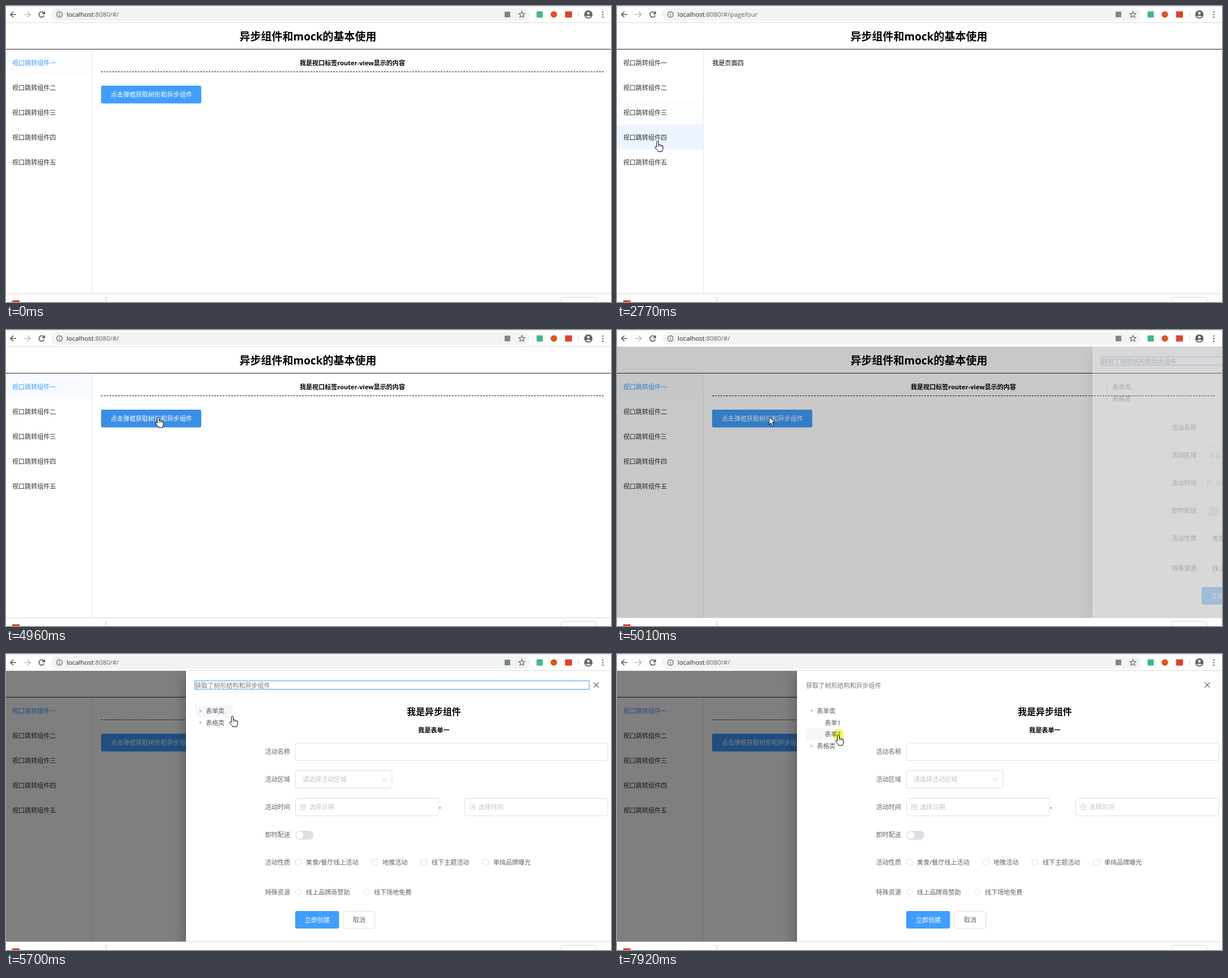
Recreate the animation shown at these times as an HTML page. Size 1069 by 524 pixels, loop 7.99 s.

```html
<!DOCTYPE html>
<html lang="zh-CN">
<head>
<meta charset="utf-8">
<title>异步组件和mock的基本使用</title>
<style>
  html, body { margin: 0; width: 100%; height: 100%; overflow: hidden; background: #fff; }
  body { position: relative; font: 11.07px "Noto Sans", "Noto Sans CJK SC", "Noto Sans CJK", "Noto Sans CJK JP", sans-serif; }
  svg { position: absolute; left: 0; top: 0; overflow: hidden; }
  text { white-space: pre; }
  .b { font-weight: 700; }
  .mid { text-anchor: middle; }
  .end { text-anchor: end; }
  .url { font: 11.4px "Open Sans", "Noto Sans", sans-serif; fill: #5f6368; }
  .line { fill: none; stroke: #dcdfe6; }
  .hint { fill: #c0c4cc; }
  #view { position: absolute; left: 0; top: 30px; width: 1069px; height: 479px; overflow: hidden; }
  #dim { position: absolute; inset: 0; background: #000; opacity: 0; }
  #drawer {
    position: absolute; left: 318px; top: 0; width: 751px; height: 479px; background: #fff; color: #606266;
    box-shadow: 0 6px 8px -4px rgba(0,0,0,.2), 0 13px 19px 2px rgba(0,0,0,.14), 0 5px 24px 4px rgba(0,0,0,.12);
  }
  #tree { position: absolute; left: 16px; top: 61px; width: 67px; }
  .row { position: relative; height: 20.5px; line-height: 20.5px; padding-left: 19px; white-space: nowrap; }
  #kids { overflow: hidden; height: 0; }
  #kids .row { padding-left: 33px; }
  .caret {
    position: absolute; left: 8px; top: 7px; width: 4px; height: 6px;
    background: #c0c4cc; clip-path: polygon(0 0, 100% 50%, 0 100%);
  }
  #ring {
    position: absolute; left: -10px; top: -10px; width: 20px; height: 20px; border-radius: 50%;
    background: #ffff5c; mix-blend-mode: multiply;
  }
</style>
</head>
<body>
<svg id="page" width="1069" height="524"></svg>
<div id="view">
  <div id="dim"></div>
  <div id="drawer">
    <svg width="751" height="479"><g id="form" transform="translate(-318 -30)"></g></svg>
    <div id="tree">
      <div class="row"><i class="caret" id="caret"></i>表单类</div>
      <div id="kids"><div class="row">表单1</div><div class="row">表单2</div></div>
      <div class="row"><i class="caret"></i>表格类</div>
    </div>
  </div>
</div>
<div id="ring"></div>
<svg width="1069" height="524">
  <g id="hand" fill="#fff" stroke="#000" stroke-linejoin="round">
    <path d="M-1.7 11V1.7a1.6 1.6 0 0 1 3.2 0V6.5q2-.8 2.9.6q2-.5 2.7.9q2.2-.2 2.2 1.8V13q0 2-1.6 4v1.8H.2v-1.4q-2-1.6-4.7-5.6q-.8-1.6.7-2q1.2-.1 2.1 1.2z"/>
    <path d="M1.5 6.5v3.5M4.4 7.1v3M7.1 8v2.5" fill="none" stroke-width=".8"/>
  </g>
  <path id="arrow" d="M0 0V13.5l3.1-2.9 2.2 5 2.3-1-2.2-4.8h4.3z" fill="#fff" stroke="#000" stroke-width=".9"/>
</svg>
<script>
const T = 7990, STEP = 10;
const EM = 11.07;
const MENU = { top: 78, row: 44, width: 152 };
const TREE = { left: 334, top: 91, row: 20.5, width: 67 };
const BUTTON = { x: 168, y: 141, w: 177, h: 31.5 };
const $ = id => document.getElementById(id);

// ---- drawing helpers (y is the middle of the text) ----
const text = (x, y, s, attrs = '') => `<text x="${x}" y="${y + 4}" ${attrs}>${s}</text>`;
const box = (x, y, w, h, attrs = 'class="line"', r = 3) =>
  `<rect x="${x}" y="${y}" width="${w}" height="${h}" rx="${r}" ${attrs}/>`;
const path = (d, color, width = 1, extra = '') =>
  `<path d="${d}" fill="none" stroke="${color}" stroke-width="${width}" ${extra}/>`;
const disc = (x, y, r, attrs) => `<circle cx="${x}" cy="${y}" r="${r}" ${attrs}/>`;
const solid = color => `fill="${color}"`;
const field = (x, y, w) => box(x, y - 15.5, w, 31);
const widthOf = s => [...s].reduce((w, c) => w + (c === '/' ? 4.1 : EM), 0);

const numerals = ['一', '二', '三', '四', '五'];
const routes = ['', 'pagetwo', 'pagethree', 'pagefour', 'pagefive'];
const ink = '#5f6368', bold = '#54575b', red = '#e2402c';

const toolbar =
  path('M0 .5H1069', '#dcdee1') + path('M0 29.5H1069', '#d9dbde') +
  box(80, 4, 846, 22, solid('#f1f3f4'), 11) +
  path('M18 15H8M13 10L8 15L13 20', bold, 1.6) +
  path('M32 15H43M38 10L43 15L38 20', '#b9bcbf', 1.6) +
  path('M67.4 13A4.8 4.8 0 1 0 67.6 16.5M68.2 9.5V13.6H64', bold, 1.6) +
  disc(94.5, 15, 4.9, `fill="none" stroke="${ink}" stroke-width="1.2"`) +
  path('M94.5 14.2V17.8M94.5 12V13.2', ink, 1.2) +
  text(107, 15, '<tspan fill="#202124">localhost</tspan>:8080/#/', 'class="url"') +
  text(200, 15, '', 'class="url" id="route"') +
  box(881, 10, 10, 10, solid('#80858a'), 1) +
  path('M911.5 9.6L913 13.4L917 13.6L913.9 16.1L915 20L911.5 17.8L908 20L909.1 16.1L906 13.6L910 13.4Z', ink, 1.1) +
  box(937.5, 9.5, 11, 11, solid('#41b883'), 0) +
  disc(968, 15, 5.8, solid('#e2531f')) +
  box(988, 9.5, 12, 11, solid(red), 0) +
  path('M1011.5 9V21', '#d5d7da') +
  disc(1029, 15, 7.3, solid(ink)) + disc(1029, 12.7, 2.3, solid('#fff')) +
  `<path d="M1024.3 18.6q4.7-3.4 9.4 0q-4.7 4-9.4 0z" fill="#fff"/>` +
  [-1, 0, 1].map(k => disc(1054.5, 15.2 + 4.5 * k, 1.3, solid(ink))).join('');

const menu = numerals.map((n, i) => {
  const y = MENU.top + MENU.row * i;
  return box(0, y, MENU.width, MENU.row, 'class="glow" fill="#ecf5ff"', 0) +
    text(11, y + 22.5, '视口跳转组件' + n, 'class="item" fill="#303133"');
}).join('');

const home = '<g id="home">' +
  text(612, 101, '我是视口标签router-view显示的内容', 'class="b mid"') +
  path('M168 116.5H1056', '#000', 1, 'stroke-dasharray="3 2"') +
  box(BUTTON.x, BUTTON.y, BUTTON.w, BUTTON.h, 'id="open"') +
  text(185, 157, '点击弹框获取树形和异步组件', solid('#fff')) + '</g>';

$('page').innerHTML = toolbar +
  '<text class="b mid" x="533.5" y="61" font-size="19">异步组件和mock的基本使用</text>' +
  menu + path('M0 76.5H1069', '#222') + path('M152.5 78V509', '#e6e6e6') +
  home + text(168.5, 101, '', 'id="other"') +
  path('M0 509.5H1069', '#d5d7da') + path('M176.5 515V524', '#c4c6c9') +
  box(11, 521, 13, 5, solid(red), 0) + box(980.5, 515.5, 62, 20, 'fill="none" stroke="#d5d7da"');

// ---- form in the drawer ----
const dark = solid('#606266'), pale = '#c0c4cc', hint = 'class="hint"';
const rowY = i => 173 + 49 * i;
const radioY = 421.5, left = 511.5;
const label = (s, y) => text(502, y, s, 'class="end" ' + dark);

function options(names, y, mark) {
  let x = left;
  return names.map(s => {
    const part = mark(x) + text(x + 18.6, y, s, dark);
    x += 42.5 + widthOf(s);
    return part;
  }).join('');
}

$('form').innerHTML =
  text(334, 56, '获取了树形结构和异步组件', solid('#72767b')) +
  box(333.5, 47.5, 697, 15, 'id="focus" fill="none" stroke="#4f9cee"', 0) +
  path('M1038.5 50.5l9 9m0-9l-9 9', '#606266', 1.1) +
  '<text class="b mid" x="756" y="107.5" font-size="15.9">我是异步组件</text>' +
  text(756, 135, '我是表单一', 'class="b mid"') +
  ['活动名称', '活动区域', '活动时间', '即时配送', '活动性质'].map((s, i) => label(s, rowY(i))).join('') +
  label('特殊资源', radioY) +
  field(left, rowY(0), 552) + field(left, rowY(1), 170.5) +
  field(left, rowY(2), 252.5) + field(810.5, rowY(2), 253) +
  text(524, rowY(1), '请选择活动区域', hint) + path('M664.5 220l4 4l4-4', pale) +
  path('M520.5 267.5h9v8h-9zm0 2.5h9m-6.5-4v2m4-2v2m-4.5 4.5h5', pale, .9) +
  text(535.5, rowY(2), '选择日期', hint) + text(765, rowY(2), '-') +
  disc(824.3, rowY(2), 4.6, `fill="none" stroke="${pale}"`) + path('M824.3 268v3.4h2.7', pale) +
  text(834.5, rowY(2), '选择时间', hint) +
  box(left, 313, 31.5, 15.8, solid('#dcdfe6'), 7.9) + disc(519.3, 320.9, 6.3, solid('#fff')) +
  options(['美食/餐厅线上活动', '地推活动', '线下主题活动', '单纯品牌曝光'], rowY(4),
    x => box(x, 363.5, 10.5, 10.5, 'class="line"', 1.5)) +
  options(['线上品牌商赞助', '线下场地免费'], radioY, x => disc(x + 5.4, radioY, 5.3, 'class="line"')) +
  box(511, 455, 77.5, 31, solid('#409eff')) + text(528, 470.5, '立即创建', solid('#fff')) +
  box(596.5, 455.5, 55, 30.5) + text(613, 470.5, '取消', dark);

// ---- the visitor: where the pointer goes and when it presses ----
const start = { x: 891, y: 500 };
const stops = [
  { leave: 70, arrive: 690, x: 60, y: 146, press: 990 },
  { leave: 1530, arrive: 1840, x: 60, y: 193, press: 1990 },
  { leave: 2240, arrive: 2600, x: 72, y: 239, press: 2620, hold: 150 },
  { leave: 2850, arrive: 3160, x: 65, y: 279, press: 3230 },
  { leave: 3550, arrive: 4020, x: 50, y: 106, press: 4090 },
  { leave: 4400, arrive: 4790, x: 269, y: 154, press: 4880 },
  { leave: 5250, arrive: 5700, x: 400, y: 110 },
  { leave: 5700, arrive: 5940, x: 385, y: 104, press: 6640, hold: 150 },
  { leave: 6870, arrive: 7140, x: 386, y: 125, press: 7220, hold: 150 },
  { leave: 7440, arrive: 7750, x: 391, y: 143, press: 7920 }
];
for (const s of stops) s.release = s.press + (s.hold || 80);
const openAt = stops[5].release + 5, expandAt = stops[7].release;

const clamp = p => Math.min(1, Math.max(0, p));
const easeOut = p => 1 - (1 - clamp(p)) ** 2.24;
const glide = p => clamp(p) ** 2 * (3 - 2 * clamp(p));

function pointerAt(t) {
  let { x, y } = start;
  for (const s of stops) {
    const p = glide((t - s.leave) / (s.arrive - s.leave));
    x += (s.x - x) * p;
    y += (s.y - y) * p;
  }
  return { x, y };
}

const menuRow = ({ x, y }) => x < MENU.width ? Math.floor((y - MENU.top) / MENU.row) : -1;
const treeRow = ({ x, y }, count) => {
  const row = Math.floor((y - TREE.top) / TREE.row);
  return x >= TREE.left && x <= TREE.left + TREE.width && row < count ? row : -1;
};
const onButton = ({ x, y }) =>
  x >= BUTTON.x && x <= BUTTON.x + BUTTON.w && y >= BUTTON.y && y <= BUTTON.y + BUTTON.h;

// Play the visit once and keep the state of every step.
function rehearse() {
  const states = [];
  const fade = 1 - Math.exp(-STEP / 110);
  let glow = [.22, 0, 0, 0, 0], active = 1, route = 0, focus = -1;
  for (let t = 0; t < T; t += STEP) {
    const at = pointerAt(t), opened = t >= openAt;
    const hover = t < stops[0].leave || opened ? -1 : menuRow(at);
    const down = stops.some(s => t >= s.press && t < s.release);
    for (const s of stops) {
      if (t === s.press) focus = hover;
      if (t === s.release && hover >= 0) route = hover;
    }
    glow = glow.map((g, i) => g + ((i === hover || i === focus) - g) * fade);
    active += ((route === 0) - active) * fade;
    states.push({ t, at, opened, hover, down, route, glow, active });
  }
  return states;
}

// ---- painting ----
const glows = document.querySelectorAll('.glow');
const firstItem = document.querySelector('.item');
const treeRows = [...document.querySelectorAll('#tree .row')];
const mix = (a, b, p) => `rgb(${a.map((v, i) => Math.round(v + (b[i] - v) * p))})`;
const toggle = (id, on) => { $(id).style.display = on ? '' : 'none'; };

function paint({ t, at, opened, hover, down, route, glow, active }) {
  glows.forEach((el, i) => el.setAttribute('opacity', glow[i]));
  firstItem.setAttribute('fill', mix([48, 49, 51], [64, 158, 255], active));
  $('route').textContent = routes[route];
  $('other').textContent = route ? '我是页面' + numerals[route] : '';
  toggle('home', route === 0);

  const armed = !opened && route === 0 && onButton(at);
  const pressed = down || t >= stops[5].release;
  $('open').setAttribute('fill', !armed ? '#409eff' : pressed ? '#3a8ee6' : '#66b1ff');

  const shown = easeOut((t - openAt) / 300);
  $('dim').style.opacity = .5 * easeOut((t - openAt) / 200);
  $('drawer').style.opacity = shown;
  $('drawer').style.transform = `translateX(${Math.round(751 * (1 - shown))}px)`;
  toggle('focus', t < stops[7].press);

  const grown = easeOut((t - expandAt) / 300);
  $('kids').style.height = 2 * TREE.row * grown + 'px';
  $('caret').style.transform = `rotate(${90 * grown}deg)`;
  let row = opened ? treeRow(at, grown ? 4 : 2) : -1;
  if (row === 1 && !grown) row = 3;
  treeRows.forEach((el, i) => { el.style.background = i === row ? '#f5f7fa' : ''; });

  const link = hover >= 0 || armed || row >= 0, entered = t >= stops[0].leave;
  toggle('hand', entered && link);
  toggle('arrow', entered && !link);
  toggle('ring', down);
  for (const id of ['hand', 'arrow']) $(id).setAttribute('transform', `translate(${at.x} ${at.y})`);
  $('ring').style.transform = `translate(${at.x}px, ${at.y}px)`;
}

const states = rehearse();
const began = performance.now();
function frame() {
  const t = (performance.now() - began) % T;
  paint(states[Math.floor((t + 4) / STEP) % states.length]);
  requestAnimationFrame(frame);
}
frame();
</script>
</body>
</html>
```
